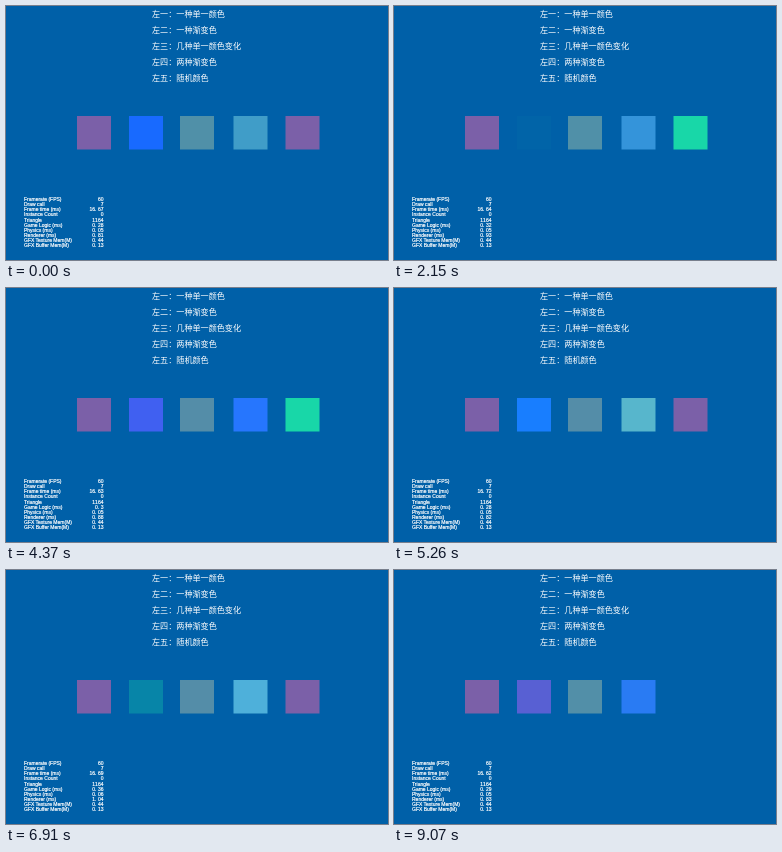
These frames come from a looping animation (382 px wide and 254 px high, 9.13 s). An HTML page:

```html
<!DOCTYPE html>
<html lang="zh-CN">
<head>
<meta charset="utf-8">
<title>颜色</title>
<style>
html, body { margin: 0; width: 100%; height: 100%; overflow: hidden; background: #0060a8; }
svg { display: block; width: 100vw; height: 100vh; }
text { fill: #fff; }
.note { font: 500 8.1px "Noto Sans CJK SC", "Noto Sans CJK", sans-serif; }
.stat { font: 5px "Liberation Sans", Arial, sans-serif; stroke: #fff; stroke-width: .2px; }
</style>
</head>
<body>
<svg id="stage" viewBox="0 0 382 254"></svg>
<script>
const LOOP = 9130, STEP = 70.05, LIFE = 5040, BIRTH = 2185, CELL = 2.8;
const BASE = [0, 96, 168];
const stage = document.getElementById('stage');

function add(tag, attrs, label = '') {
  const el = document.createElementNS('http://www.w3.org/2000/svg', tag);
  for (const k in attrs) el.setAttribute(k, attrs[k]);
  el.textContent = label;
  return stage.appendChild(el);
}

function rand(n) {
  const s = Math.sin(n * 127.1 + 41.7) * 43758.5453;
  return s - Math.floor(s);
}

// Tiles add light to the backdrop. Gradient stops: share of a life, light
const NONE = [0, 0, 0], RED = [123, 0, 0], BLUE = [24, 0, 123], GREEN = [24, 119, 0];
const GREY = [60, 60, 60];
const single = [[0, NONE], [.27, RED], [.545, BLUE], [.8, GREEN], [1, NONE]];
const double = [[0, GREY], [.2, [68, 50, 80]], [.433, [34, 20, 79]],
  [.566, [75, 72, 38]], [.79, [98, 104, 12]], [1, GREY]];
const picks = [RED, BLUE, GREEN, NONE, NONE];

const lerp = (a, b, f) => a.map((v, i) => v + (b[i] - v) * f);

function sample(stops, age) {
  const i = Math.max(1, stops.findIndex(s => s[0] >= age));
  const [from, a] = stops[i - 1], [to, b] = stops[i];
  return lerp(a, b, (age - from) / (to - from));
}

// Stepping by 17 around a ring of 49 scatters the picks evenly
const pick = n => picks[Math.floor((n * 17 + 4) % 49 / 49 * picks.length)];

const rgb = light =>
  `rgb(${BASE.map((v, i) => Math.min(255, Math.round(v + light[i])))})`;

['左一：一种单一颜色', '左二：一种渐变色', '左三：几种单一颜色变化', '左四：两种渐变色', '左五：随机颜色']
  .forEach((s, i) => add('text', { class: 'note', x: 146, y: 10.8 + i * 16.1 }, s));

const tiles = [71, 123, 174, 227.5, 279.5].map(x =>
  add('rect', { x, y: 110, width: 34, height: 33.5 }));

const labels = ['Framerate (FPS)', 'Draw call', 'Frame time (ms)', 'Instance Count', 'Triangle',
  'Game Logic (ms)', 'Physics (ms)', 'Renderer (ms)', 'GFX Texture Mem(M)', 'GFX Buffer Mem(M)'];
const rowY = i => 195.1 + i * 5.13;
labels.forEach((s, i) => add('text', { class: 'stat', x: 18, y: rowY(i) }, s));
const cells = labels.map((_, i) => add('text', { class: 'stat', y: rowY(i) }));

// Digits sit in equal cells, flush right
function setCells(el, value) {
  const s = String(value);
  if (el.textContent === s) return;
  el.setAttribute('x', [...s].map((_, i) => (97.5 - (s.length - i) * CELL).toFixed(2)).join(' '));
  el.textContent = s;
}

function stats(slot) {
  const logic = .28 + .1 * rand(slot) ** 2;
  const [frame, game, physics, render] =
    [16.6 + .2 * rand(slot + 50), logic, logic / 6, logic * 2.9].map(v => +v.toFixed(2));
  return [60, 7, frame, 0, 1164, game, physics, render, 0.44, 0.13];
}

function draw(t) {
  const lives = (t - BIRTH) / LIFE + 1;
  const life = Math.floor(lives), age = lives - life;
  const mix = life * .618 % 1;
  const strength = .85 + .4 * mix;
  [
    RED,
    sample(single, age),
    lerp([80, 48, 0], [87, 43, 0], mix),
    sample(double, age).map(v => v * strength),
    pick(Math.floor(t / STEP))
  ].forEach((light, i) => tiles[i].setAttribute('fill', rgb(light)));
  stats(Math.floor(t / 500)).forEach((v, i) => setCells(cells[i], v));
}

const start = performance.now();
function loop() {
  draw((performance.now() - start) % LOOP);
  requestAnimationFrame(loop);
}
loop();
</script>
</body>
</html>
```
